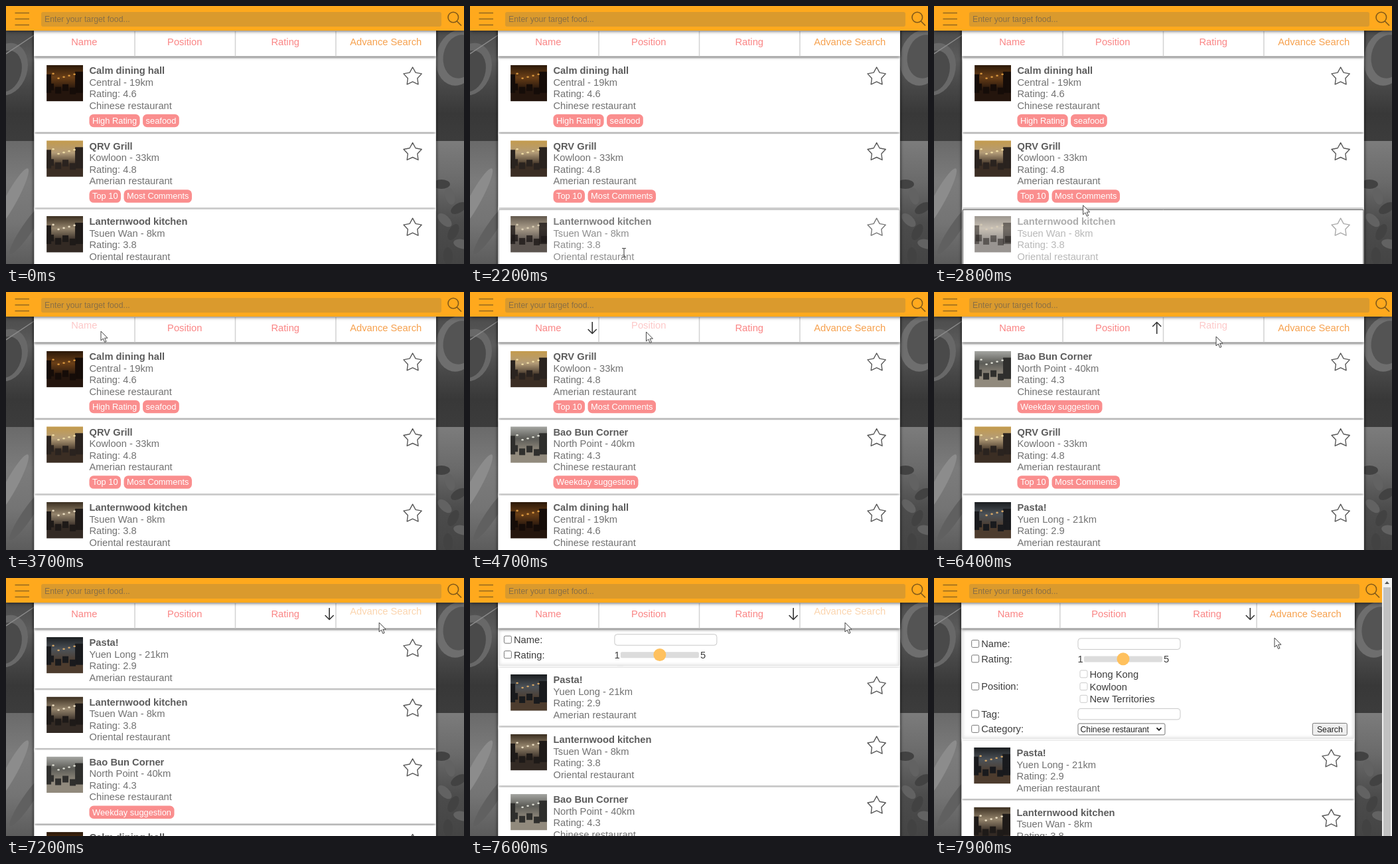
An HTML page with a canvas that plays this animation: 690x388 px, repeating every 8 s.

```html
<!DOCTYPE html>
<html lang="en">
<head>
<meta charset="utf-8">
<title>Restaurant list</title>
<style>
html, body { margin: 0; width: 100%; height: 100%; overflow: hidden; background: #555; }
canvas { display: block; width: 690px; height: 388px; }
</style>
</head>
<body>
<canvas id="stage" width="690" height="388"></canvas>
<script>
const c = document.getElementById('stage').getContext('2d');
const LOOP = 8000;
const FONT = '"Liberation Sans", Arial, sans-serif';
const PINK = '#fa8585', INK = '#3c3c3c';

// look: ceiling, middle, floor, furniture, lamp
const places = {
  calm: { name: 'Calm dining hall', where: 'Central - 19km', rating: 4.6, kind: 'Chinese restaurant',
    tags: ['High Rating', 'seafood'], look: ['#2a1809', '#6a3f17', '#24150d', '#150c08', '#d9973f'] },
  grill: { name: 'QRV Grill', where: 'Kowloon - 33km', rating: 4.8, kind: 'Amerian restaurant',
    tags: ['Top 10', 'Most Comments'], look: ['#c49b4c', '#b39c78', '#3b2e24', '#2a231f', '#efdca4'] },
  lantern: { name: 'Lanternwood kitchen', where: 'Tsuen Wan - 8km', rating: 3.8, kind: 'Oriental restaurant',
    tags: [], look: ['#3a2e20', '#94846c', '#332a24', '#1e1a18', '#e9dcc0'] },
  pasta: { name: 'Pasta!', where: 'Yuen Long - 21km', rating: 2.9, kind: 'Amerian restaurant',
    tags: [], look: ['#1a1d20', '#4c5258', '#4d3c2e', '#191a1d', '#d3a566'] },
  bao: { name: 'Bao Bun Corner', where: 'North Point - 40km', rating: 4.3, kind: 'Chinese restaurant',
    tags: ['Weekday suggestion'], look: ['#a5a6a2', '#5c5c57', '#918a7d', '#2f2f2d', '#dfe0d6'] }
};

// [start, order, tab with arrow, arrow direction]
const sorts = [
  [0, 'calm grill lantern pasta bao', -1, 1],
  [4100, 'grill bao calm lantern pasta', 0, 1],
  [5100, 'lantern calm pasta grill bao', 1, 1],
  [5800, 'bao grill pasta calm lantern', 1, -1],
  [6600, 'pasta lantern bao calm grill', 2, 1]
];
const tabs = [
  ['Name', PINK, 3500, 4300], ['Position', PINK, 4500, 5950],
  ['Rating', PINK, 6150, 6850], ['Advance Search', '#f6a14e', 7000, 7650]
];
const cardHovers = [[3200, 3450], [2800, 3200], [2120, 2800]];
const pointer = [
  [2200, 232, 371], [2700, 228, 310], [3100, 205, 240], [3650, 143, 59], [4200, 143, 59],
  [4750, 268, 60], [5850, 268, 60], [6350, 425, 67], [6700, 425, 67],
  [7250, 565, 67], [7600, 565, 67], [7880, 513, 90]
];

const clamp = v => Math.max(0, Math.min(1, v));
const swing = v => 0.5 - Math.cos(Math.PI * clamp(v)) / 2;
const hover = (t, from, to) => clamp((t - from) / 200) - clamp((t - to) / 200);

function text(str, x, mid, color, size = 14.73, weight = '', align = 'left') {
  c.font = `${weight} ${size}px ${FONT}`;
  c.textAlign = align;
  c.fillStyle = color;
  c.fillText(str, x, mid + size * 0.345);
}
function rect(x, y, w, h, fill) {
  c.fillStyle = fill;
  c.fillRect(x, y, w, h);
}
function box(x, y, w, h, r, fill, stroke) {
  c.beginPath();
  c.roundRect(x, y, w, h, r);
  c.fillStyle = fill;
  c.fill();
  if (stroke) { c.strokeStyle = stroke; c.lineWidth = 1; c.stroke(); }
}
function disc(x, y, rx, ry, turn, fill) {
  c.beginPath();
  c.ellipse(x, y, rx, ry, turn, 0, 7);
  c.fillStyle = fill;
  c.fill();
}
function line(color, width, ...p) {
  c.beginPath();
  for (let i = 0; i < p.length; i += 2) c.lineTo(p[i], p[i + 1]);
  c.strokeStyle = color;
  c.lineWidth = width;
  c.stroke();
}
function shadow(blur, dy, alpha, draw) {
  c.save();
  c.shadowColor = `rgba(0,0,0,${alpha})`;
  c.shadowBlur = blur;
  c.shadowOffsetY = dy;
  draw();
  c.restore();
}
function gradient(y0, y1, ...colors) {
  const g = c.createLinearGradient(0, y0, 0, y1);
  colors.forEach((k, i) => g.addColorStop(i / (colors.length - 1), k));
  return g;
}

function backdrop(right) {
  rect(0, 0, 690, 203, gradient(38, 203, '#4c4c4c', '#5c5c5c', '#484848', '#383838', '#3c3c3c'));
  disc(2, 95, 30, 40, 0.3, '#686868');
  disc(0, 98, 23, 32, 0.3, '#4a4a4a');
  line('#8c8c8c', 1.5, 0, 72, 42, 44);
  disc(right + 32, 78, 32, 42, 0.2, '#6e6e6e');
  disc(right + 36, 76, 25, 33, 0.2, '#545454');
  rect(0, 203, 42, 185, gradient(203, 388, '#6a6a6a', '#7c7c7c', '#747474', '#5c5c5c'));
  disc(8, 290, 9, 52, 0.5, '#8c8c8c');
  disc(32, 335, 8, 46, 0.6, '#606060');
  rect(right, 203, 60, 185, gradient(203, 388, '#7c7c7c', '#6a6a6a', '#4c4c4c', '#444'));
  for (let i = 0; i < 7; i++)
    disc(right + 8 + i * 13 % 34, 268 + i * 18, 13, 7, i * 1.3, i % 2 ? '#626262' : '#424242');
}

function photo(x, y, [ceiling, middle, floor, dark, lamp]) {
  c.save();
  c.beginPath();
  c.rect(x, y, 55, 54.5);
  c.clip();
  rect(x, y, 55, 55, gradient(y, y + 55, ceiling, middle, floor, floor));
  rect(x, y + 14, 7, 28, dark);
  rect(x + 43, y + 10, 12, 32, dark);
  for (let i = 0; i < 5; i++) {
    disc(x + 10 + i * 8, y + 13 + i * 7 % 9, 1.8, 1.3, 0, lamp);
    rect(x + 2 + i * 11, y + 28 + i * 5 % 9, 9, 10, dark);
  }
  c.restore();
}

function star(x, y) {
  c.beginPath();
  for (let i = 0; i < 10; i++) {
    const a = i * Math.PI / 5, r = i % 2 ? 7.6 : 14.3;
    c.lineTo(x + r * Math.sin(a), y - r * Math.cos(a));
  }
  c.closePath();
  c.strokeStyle = '#585858';
  c.lineWidth = 1.4;
  c.stroke();
}

function card(place, y, left, right, fade) {
  const height = place.tags.length ? 111 : 87.3;
  shadow(4, 1, 0.42, () => rect(left + 1, y - 10, right - left - 1.5, height, '#fff'));
  if (fade) {
    c.strokeStyle = `rgba(90,90,90,${fade})`;
    c.lineWidth = 1;
    c.strokeRect(left + 1.5, y - 9.5, right - left - 2.5, height);
  }
  c.globalAlpha = 1 - fade / 2;
  photo(left + 19, y, place.look);
  const x = left + 83.4;
  text(place.name, x, y + 8.3, '#5c5c5c', 14.73, 'bold');
  [place.where, 'Rating: ' + place.rating, place.kind]
    .forEach((s, i) => text(s, x, y + 25.8 + i * 17.5, '#717171'));
  let tagX = x;
  for (const tag of place.tags) {
    c.font = `12.85px ${FONT}`;
    const w = c.measureText(tag).width + 9;
    box(tagX, y + 74, w, 19.5, 6.5, '#fa8e8e');
    text(tag, tagX + 4.5, y + 83.7, '#fff', 12.85);
    tagX += w + 4.5;
  }
  star(right - 35.3, y + 17.6);
  c.globalAlpha = 1;
  return height + 2.6;
}

function check(x, mid, label, color = '#767676') {
  box(x + 0.5, mid - 6, 11, 11, 2, '#fff', color);
  text(label, x + 15, mid, INK);
}

function panel(left, right, open) {
  const height = 166 * open, pad = 9.4 * open;
  c.save();
  c.beginPath();
  c.rect(left, 77, right - left, height - 1);
  c.clip();
  rect(left, 77, right - left, height, '#fff');
  shadow(4, 0, 0.35, () => {
    c.strokeStyle = '#e2e2e2';
    c.lineWidth = 1;
    c.strokeRect(left + 1.5, 77.5, right - left - 3, height - 2.5);
  });
  const x = left + 5.6 + pad, field = left + 175.3, y = 90 + pad;
  [['Name:', 0], ['Rating:', 22.5], ['Position:', 64], ['Tag:', 105.5], ['Category:', 128]]
    .forEach(([s, dy]) => check(x, y + dy, s));
  for (const dy of [0, 105.5]) box(field + 0.5, y + dy - 8.5, 154, 16.5, 4, '#fff', '#c8c8c8');
  text('1', field, y + 22.5, INK);
  box(field + 9.5, y + 18, 118, 9, 2, '#dcdcdc');
  disc(field + 68.5, y + 22.3, 9.5, 9.5, 0, '#ffc15e');
  text('5', field + 129.5, y + 22.5, INK);
  ['Hong Kong', 'Kowloon', 'New Territories']
    .forEach((s, i) => check(field + 3, y + 45.5 + i * 18.7, s, '#ccc'));
  box(field + 0.5, y + 119.5, 131, 17, 2, '#fff', '#767676');
  text('Chinese restaurant', field + 4, y + 128, '#222', 12.26);
  line('#222', 2, field + 119, y + 126, field + 122.5, y + 129.5, field + 126, y + 126);
  box(right - 63.5, y + 119, 52, 18, 2, '#efefef', '#767676');
  text('Search', right - 37.5, y + 128, '#222', 12.26, '', 'center');
  c.restore();
}

function tabBar(t, left, right, active, dir) {
  const w = (right - left) / 4;
  shadow(4, 1, 0.6, () => rect(left, 36, right - left, 39.5, '#fff'));
  tabs.forEach(([label, color, from, to], i) => {
    const h = hover(t, from, to), x = left + w * i, ax = x + w - 9.3;
    if (i) line('#d2d2d2', 1.5, x + 0.5, 38, x + 0.5, 75.5);
    c.globalAlpha = 1 - h * 0.55;
    text(label, x + w / 2, 54 - 4 * h, color, 14.73, '', 'center');
    if (i === active) {
      line('#333', 1.6, ax, 54 - 9 * dir, ax, 54 + 8 * dir);
      line('#333', 1.6, ax - 6.5, 54 + 2 * dir, ax, 54 + 8.5 * dir, ax + 6.5, 54 + 2 * dir);
    }
    c.globalAlpha = 1;
  });
}

function header(width) {
  shadow(5, 1, 0.6, () => rect(0, 0, width, 37, '#ffa91d'));
  for (const y of [10.5, 19.5, 28.5]) line('#8a6420', 1.4, 13.5, y, 35, y);
  box(53, 9, width - 87, 22, 3, '#da9a2d');
  text('Enter your target food...', 58, 20, '#8a6f45', 12.26);
  c.beginPath();
  c.arc(width - 16.2, 17, 7.8, 0, 7);
  c.strokeStyle = '#80591a';
  c.lineWidth = 1.6;
  c.stroke();
  line('#80591a', 1.7, width - 11, 22.5, width - 4, 29.5);
}

function scrollbar(x) {
  rect(x, 0, 690 - x, 388, '#f1f1f1');
  rect(x + 2, 14, 11, 374, '#c1c1c1');
  c.beginPath();
  c.moveTo(x + 4, 9);
  c.lineTo(x + 7.5, 5);
  c.lineTo(x + 11, 9);
  c.fillStyle = '#555';
  c.fill();
}

function cursor(t) {
  if (t < pointer[0][0]) return;
  const next = pointer.findIndex(p => p[0] > t);
  const b = pointer[next < 0 ? pointer.length - 1 : next];
  const a = next < 0 ? b : pointer[next - 1];
  const k = a === b ? 0 : swing((t - a[0]) / (b[0] - a[0]));
  const x = a[1] + (b[1] - a[1]) * k, y = a[2] + (b[2] - a[2]) * k;
  if (t < 2700) {
    line('#555', 1.2, x, y - 6, x, y + 6);
    for (const d of [-6.5, 6.5]) line('#555', 1.2, x - 3, y + d, x + 3, y + d);
    return;
  }
  c.save();
  c.translate(x, y);
  c.beginPath();
  [0, 0, 0, 14, 3.3, 11, 5.7, 16.5, 8, 15.5, 5.6, 10.2, 10, 10.2]
    .forEach((v, i, p) => i % 2 || c.lineTo(v, p[i + 1]));
  c.closePath();
  c.fillStyle = '#fff';
  c.fill();
  c.strokeStyle = '#444';
  c.lineWidth = 1;
  c.stroke();
  c.restore();
}

function draw(t) {
  const width = t < 7800 ? 690 : 675;
  const left = width * 0.061, right = left + width * 0.878;
  const [, order, active, dir] = sorts.filter(s => s[0] <= t).pop();
  const open = t < 7500 ? 0 : swing((t - 7420) / 455);

  c.lineJoin = 'round';
  backdrop(right);
  shadow(5, 0, 0.65, () => rect(left, 30, right - left, 380, '#fff'));
  let y = 88.7 + 166 * open;
  order.split(' ').forEach((key, i) => {
    const h = cardHovers[i] ? hover(t, ...cardHovers[i]) : 0;
    y += card(places[key], y, left, right, h);
  });
  if (open) panel(left, right, open);
  tabBar(t, left, right, active, dir);
  header(width);
  if (width < 690) scrollbar(width);
  cursor(t);
}

function tick() {
  draw(Math.floor(performance.now() % LOOP / 100) * 100);
  requestAnimationFrame(tick);
}
tick();
</script>
</body>
</html>
```
